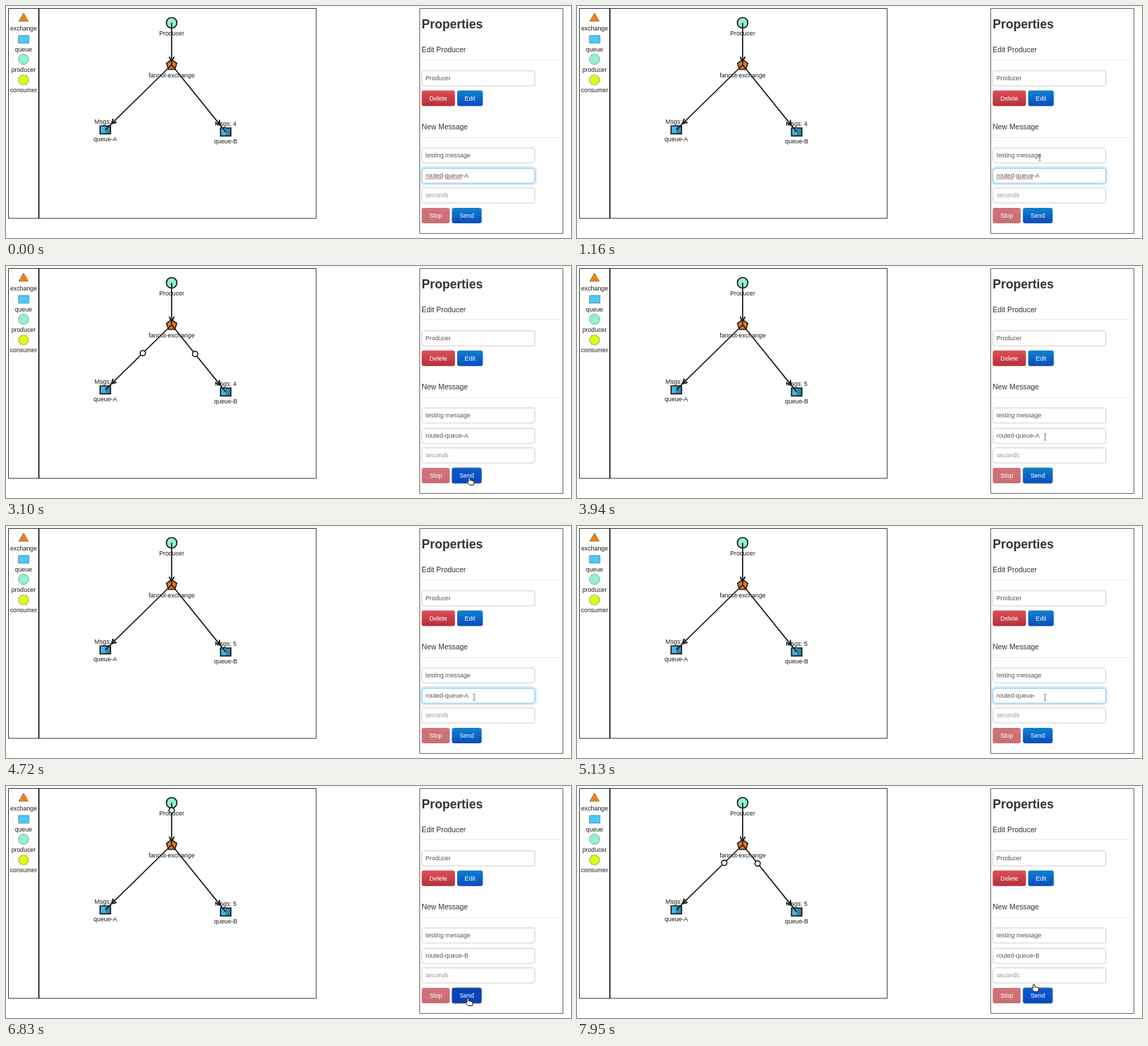
Animation, 805 px wide and 331 px high, one loop 8 s. Source, as an HTML page with a canvas:

```html
<!DOCTYPE html>
<html lang="en">
<head>
<meta charset="utf-8">
<title>Message flow</title>
<style>
html, body { margin: 0; width: 100%; height: 100%; overflow: hidden; background: #fff; }
canvas { display: block; width: 805px; height: 331px; }
</style>
</head>
<body>
<canvas id="stage"></canvas>
<script>
const LOOP = 8000;
const STEP = 140;
const SPEED = 1.12 / 1000; // share of a connection travelled per ms
const INK = '#1c1c1c';
const FONT = '"Liberation Sans", Arial, sans-serif';

const SEND_1 = 1940, FOCUS = 4200, ERASE = 5130, CHECK = 5280, RETYPE = 5570, SEND_2 = 6830;
const SENDS = [{ at: SEND_1, lag: 0 }, { at: SEND_2, lag: STEP }];
const DELIVERED = 3680;

const PRODUCER = [236, 24], EXCHANGE = [236, 84], QUEUES = [[141.5, 176.6], [313, 179.6]];

// Each glide eases the pointer to a new place; bow bends its path sideways.
const HOME = [583, 64];
const GLIDES = [
  { at: 780, time: 640, to: [660, 302], bow: 30 },
  { at: 3100, time: 700, to: [667, 244], bow: 10 },
  { at: 6120, time: 430, to: [658, 303], bow: 0 },
  { at: 7800, time: 150, to: [651, 283], bow: 0 }
];

const canvas = document.getElementById('stage');
const c = canvas.getContext('2d');
const ratio = window.devicePixelRatio || 1;
canvas.width = 805 * ratio;
canvas.height = 331 * ratio;

const mix = (p, q, k) => [p[0] + (q[0] - p[0]) * k, p[1] + (q[1] - p[1]) * k];
const during = (t, from, to) => t >= from && t < to;
const stepped = t => Math.floor(t / STEP) * STEP;

function text(str, x, y, { size = 8.8, color = '#1c1c1c', align = 'center', weight = '' } = {}) {
  c.font = `${weight} ${size}px ${FONT}`;
  c.textAlign = align;
  c.fillStyle = color;
  c.fillText(str, x, y);
}

function paint(fill, stroke, width = 1) {
  if (fill) { c.fillStyle = fill; c.fill(); }
  if (stroke) { c.strokeStyle = stroke; c.lineWidth = width; c.stroke(); }
}

function disc(x, y, r, ...style) {
  c.beginPath();
  c.arc(x, y, r, 0, Math.PI * 2);
  paint(...style);
}

function box(x, y, w, h, r, ...style) {
  c.beginPath();
  c.roundRect(x, y, w, h, r);
  paint(...style);
}

function poly(points, ...style) {
  c.beginPath();
  points.forEach(p => c.lineTo(...p));
  c.closePath();
  paint(...style);
}

function line(x1, y1, x2, y2, color, width = 1) {
  c.beginPath();
  c.moveTo(x1, y1);
  c.lineTo(x2, y2);
  paint(null, color, width);
}

function ring(x, y, n, radius) {
  return Array.from({ length: n }, (_, i) => {
    const a = i / n * Math.PI * 2 - Math.PI / 2, r = radius(i);
    return [x + r * Math.cos(a), y + r * Math.sin(a)];
  });
}

function legend() {
  poly([[25, 10], [31.8, 21.8], [18.2, 21.8]], '#ee8018', '#9a6a38', .8);
  box(17.8, 42, 15, 11, 0, '#4cc8fb', '#4f7f96', .8);
  disc(25, 76, 7.4, '#94f0d0', '#6f9f90', .8);
  poly(ring(25, 105.5, 20, i => i % 2 ? 6.4 : 7.8), '#e0fb14', '#8f9a38', .8);
  ['exchange', 'queue', 'producer', 'consumer'].forEach((s, i) => text(s, 25, 35.2 + i * 29.3));
}

function queue([x, y], name, count) {
  box(x - 7.4, y - 5.6, 14.8, 11.4, 0, '#47b4e4');
  c.fillStyle = '#2f88aa';
  c.fillRect(x, y - 5.6, 7.4, 11.4);
  box(x - 7.4, y - 5.6, 14.8, 11.4, 0, null, INK, 1.7);
  text(name, x, y + 16.8);
  text('Msgs: ' + count, x, y - 9);
}

function arrow(from, to, gap) {
  const a = Math.atan2(to[1] - from[1], to[0] - from[0]);
  const tip = [to[0] - gap * Math.cos(a), to[1] - gap * Math.sin(a)];
  line(...from, ...to, INK, 1.7);
  for (const s of [-.5, .5]) {
    line(...tip, tip[0] - 7.5 * Math.cos(a + s), tip[1] - 7.5 * Math.sin(a + s), INK, 1.9);
  }
}

function messages(t) {
  const sent = SENDS.filter(s => t >= s.at).pop();
  if (!sent) return;
  const k = .18 + SPEED * stepped(Math.max(0, t - sent.at - sent.lag));
  if (k >= 2) return;
  const spots = k < 1 ? [mix(PRODUCER, EXCHANGE, k)] : QUEUES.map(q => mix(EXCHANGE, q, k - 1));
  spots.forEach(p => disc(...p, 3.8, '#fff', INK, 1.6));
}

function graph(t) {
  box(3.5, 3.5, 438.5, 299.5, 0, null, '#333');
  line(46.8, 3, 46.8, 303, INK, 1.7);
  legend();
  disc(...PRODUCER, 7.5, '#8ff0cb', INK, 1.7);
  text('Producer', 236, 42);
  poly(ring(236, 84.3, 5, () => 7.7), '#e87a18', INK, 1.6);
  text('fanout-exchange', 236, 102);
  QUEUES.forEach((q, i) => queue(q, 'queue-' + 'AB'[i], t < DELIVERED ? 4 : 5));
  arrow(PRODUCER, EXCHANGE, 5);
  QUEUES.forEach(q => arrow(EXCHANGE, q, 12.5));
  messages(t);
}

function field(y, str, color = '#555', glow = 0) {
  c.save();
  if (glow) {
    c.shadowColor = `rgba(82,168,236,${.55 * glow})`;
    c.shadowBlur = 5 * ratio;
  }
  box(592.5, y + .5, 161, 21.5, 2.8, '#fff', glow ? '#93c9ea' : '#cecece');
  c.restore();
  text(str, 597.7, y + 14.2, { color, align: 'left' });
}

function button(x, y, w, label, top, bottom, outline) {
  const g = c.createLinearGradient(0, y, 0, y + 22);
  g.addColorStop(0, top);
  g.addColorStop(1, bottom);
  box(x + .3, y + .3, w - .6, 22.2, 3, g, outline, .8);
  text(label, x + w / 2, y + 14.4, { color: '#fff' });
}

function squiggle(word, before) {
  c.font = `8.8px ${FONT}`;
  const x = 597.7 + c.measureText(before).width, w = c.measureText(word).width;
  c.beginPath();
  for (let i = 0; i <= w; i++) c.lineTo(x + i, 246.4 + (i % 2 ? .5 : -.3));
  paint(null, '#e0423e');
}

function panel(t, hover) {
  const editing = t < SEND_1 || during(t, FOCUS, SEND_2);
  const glow = editing ? (t < FOCUS ? 1 : Math.min(1, .5 + (t - FOCUS) / 480)) : 0;
  const route = 'routed-queue-' + (t < ERASE ? 'A' : t < RETYPE ? '' : 'B');
  const heading = { size: 10.4, color: '#333', align: 'left' };

  box(589.5, 3.5, 204, 321, 0, '#fff', '#666');
  text('Properties', 592.3, 31.6, { ...heading, size: 17.6, weight: 'bold' });
  text('Edit Producer', 592.3, 65.6, heading);
  text('New Message', 592.3, 175.8, heading);
  for (const y of [76.5, 187.5]) line(592, y, 789, y, '#ececec');

  field(92, 'Producer');
  field(202, 'testing message');
  field(231, route, '#555', glow);
  field(259, 'seconds', '#999');
  if (t < SEND_1 || during(t, CHECK, SEND_2)) {
    squiggle('routed', '');
    squiggle('queue', 'routed-');
  }
  if (during(t, 130, 780) || during(t, 6690, SEND_2)) line(659.4, 236, 659.4, 247, '#333', .9);

  button(592, 120.2, 48, 'Delete', '#dd5059', '#b5303a');
  button(642.5, 120.2, 37.2, 'Edit', '#0d84cd', '#0a4cc0');
  button(592, 287.6, 40.5, 'Stop', '#d2747a', '#c96d74');
  const pressed = SENDS.some(s => during(t, s.at, s.at + 270));
  const shades = pressed ? ['#0a46b4', '#0642bd'] : hover ? ['#0a5ecb', '#0646c6'] : ['#0d84cd', '#0a4cc0'];
  button(635, 287.6, 43, 'Send', ...shades, editing ? null : '#5f8a78');
}

const overSend = ([x, y]) => x > 634 && x < 679 && y > 282 && y < 311;
const overField = ([x, y]) => x > 592 && x < 754 && [92, 202, 231, 259].some(f => y > f && y < f + 22);

function pointerAt(t) {
  let spot = HOME;
  for (const { at, time, to, bow } of GLIDES) {
    const k = Math.min(1, Math.max(0, (t - at) / time));
    spot = mix(spot, to, k * k * (3 - 2 * k));
    spot[0] += bow * Math.sin(Math.PI * k * k);
  }
  return spot;
}

function hand() {
  c.beginPath();
  c.moveTo(-1.2, 6);
  c.lineTo(-1.2, .6);
  c.quadraticCurveTo(0, -1, 1.2, .6);
  c.lineTo(1.2, 4);
  c.quadraticCurveTo(4, 3.2, 4.4, 4.6);
  c.quadraticCurveTo(7.2, 4, 7.2, 6);
  c.lineTo(6.2, 10.5);
  c.lineTo(.6, 10.5);
  c.lineTo(-3.2, 6.6);
  c.quadraticCurveTo(-3, 4.4, -1.2, 6);
  c.closePath();
  paint('#fff', '#111');
}

function iBeam() {
  line(0, -4, 0, 4, '#666', .9);
  for (const y of [-4.4, 4.4]) line(-1.8, y, 1.8, y, '#777', .8);
}

function pointer(spot) {
  c.save();
  c.translate(...spot);
  if (overSend(spot)) hand();
  else if (overField(spot)) iBeam();
  else poly([[0, 0], [0, 10], [2.4, 8], [4, 11.4], [5.4, 10.8], [4, 7.4], [7, 7]], '#111', '#fff', .8);
  c.restore();
}

function draw(t) {
  const spot = pointerAt(t), visible = t >= GLIDES[0].at;
  c.setTransform(ratio, 0, 0, ratio, 0, 0);
  c.fillStyle = '#fff';
  c.fillRect(0, 0, 805, 331);
  c.fillStyle = '#f9f9f9';
  c.fillRect(0, 0, 805, 2.5);
  graph(t);
  panel(t, visible && overSend(spot));
  if (visible) pointer(spot);
}

const start = performance.now();
function tick() {
  draw((performance.now() - start) % LOOP);
  requestAnimationFrame(tick);
}
tick();
</script>
</body>
</html>
```
